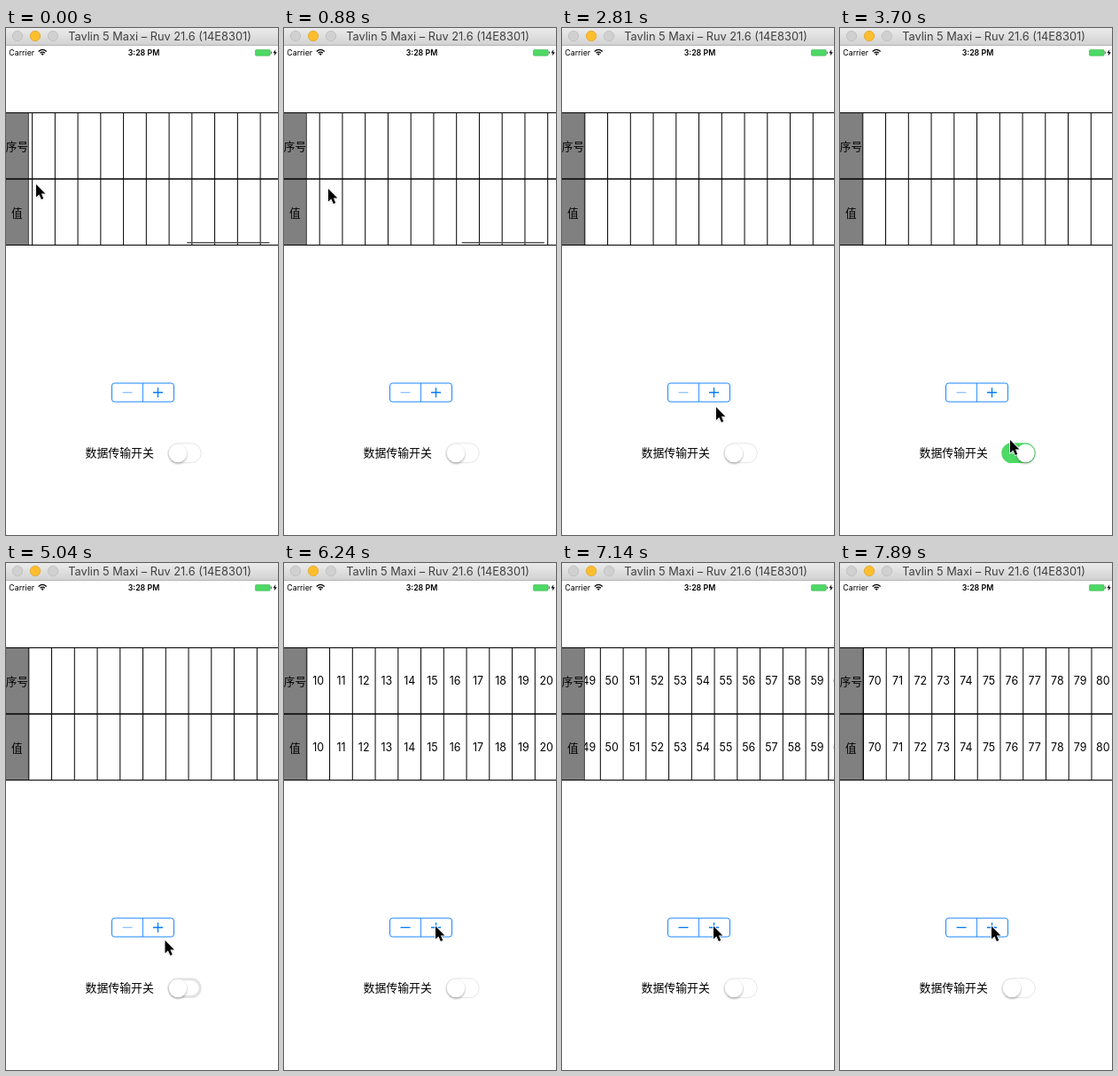
Recreate the animation shown at these times as an HTML page. Size 307x571 px, loop 8000 ms.

```html
<!DOCTYPE html>
<html lang="zh">
<head>
<meta charset="utf-8">
<title>Data table</title>
<style>
  html, body { margin: 0; width: 100%; height: 100%; overflow: hidden; background: #fff; }
  svg { display: block; width: 100%; height: 100%; }
  text { font-family: Inter, "Noto Sans CJK SC", "Noto Sans CJK", sans-serif; }
  .cjk { font-family: "Noto Sans CJK SC", "Noto Sans CJK", sans-serif; }
  .mid { text-anchor: middle; }
</style>
</head>
<body>
<svg viewBox="0 0 307 571">
  <defs>
    <linearGradient id="bar" x2="0" y2="1">
      <stop stop-color="#ebebeb"/><stop offset="1" stop-color="#d1d1d1"/>
    </linearGradient>
    <filter id="soft" x="-50%" y="-50%" width="200%" height="200%"><feGaussianBlur stdDeviation="1"/></filter>
    <clipPath id="table"><rect x="25" y="95" width="282" height="150"/></clipPath>
  </defs>

  <rect width="307" height="571" fill="#fff"/>
  <rect width="307" height="20" fill="url(#bar)"/>
  <path d="M0 19.5H307" stroke="#b4b4b4"/>
  <g stroke-width=".7">
    <circle cx="13" cy="9" r="5.7" fill="#d0d0d0" stroke="#b9b9b9"/>
    <circle cx="33" cy="9" r="5.7" fill="#fdbe2e" stroke="#dfa023"/>
    <circle cx="53" cy="9" r="5.7" fill="#d0d0d0" stroke="#b9b9b9"/>
  </g>
  <text class="mid" x="173.5" y="14" font-size="12.8" fill="#404040">Tavlin 5 Maxi – Ruv 21.6 (14E8301)</text>

  <text x="3.3" y="31" font-size="8.8">Carrier</text>
  <g fill="none" stroke="#000" stroke-width="1.3">
    <path d="M36.7 26.4Q41.2 22.4 45.7 26.4M38.5 28.2Q41.2 25.9 43.9 28.2"/>
    <path d="M39.7 29.2Q41.2 28 42.7 29.2L41.2 31Z" fill="#000" stroke="none"/>
  </g>
  <text class="mid" x="155.5" y="31" font-size="8.8" font-weight="600">3:28 PM</text>
  <rect x="281.4" y="24.4" width="16.8" height="6.8" rx="1.3" fill="#4cd964" stroke="#3fae52" stroke-width=".6"/>
  <path d="M299.3 26.5V29" stroke="#555"/>
  <path d="M304.4 24L301.4 28.2H303.4L302.6 31.6L305.8 27.2H303.7Z"/>

  <g clip-path="url(#table)">
    <path id="lines" stroke="#000" fill="none"/>
    <g id="cells" class="mid" font-size="12.4"></g>
  </g>
  <rect y="95" width="25.3" height="150" fill="#808080"/>
  <path d="M25.4 95V245" stroke="#222" stroke-width=".8"/>
  <path d="M0 95.5H307M0 244.5H307" stroke="#000"/>
  <path d="M0 170H307" stroke="#000" stroke-width="1.5"/>
  <g class="mid" font-size="12.6">
    <text class="cjk" x="12.4" y="137.6">序号</text>
    <text class="cjk" x="12.2" y="212.6">值</text>
  </g>
  <path id="bead" d="M0 241.8H92" stroke="#555" stroke-width="1.6" stroke-linecap="round"/>

  <g fill="none" stroke="#007aff">
    <path d="M154.5 400V421" stroke-width=".8"/>
    <rect x="119.5" y="400" width="70" height="21" rx="3" stroke-width=".9"/>
    <path id="minus" d="M131.5 410.5H142.5" stroke-width="1.3"/>
    <path d="M166 410.5H177M171.5 405V416" stroke-width="1.3"/>
  </g>

  <text class="cjk" x="89.5" y="483.4" font-size="12.9">数据传输开关</text>
  <rect id="track" fill="#fff"/>
  <circle id="shade" cy="480.6" r="10.3" fill="#000" opacity=".28" filter="url(#soft)"/>
  <circle id="thumb" cy="478.8" r="10.4" fill="#fff" stroke="#000" stroke-opacity=".08" stroke-width=".5"/>

  <g id="cursor">
    <path d="M0 1V15L3.4 12L6 17.6L8.6 16.6L6.2 11H10.8Z" fill="#000" opacity=".35" filter="url(#soft)"/>
    <path d="M0 0V14.4L3.4 11.4L5.9 17L8.3 16L5.9 10.4H10.4Z" stroke="#fff" stroke-width="1.6" paint-order="stroke"/>
  </g>
</svg>
<script>
const $ = id => document.getElementById(id);
const LOOP = 8000, HOLD = 148, STEP = 148.5, LAST = 53;
const LEFT = 25.8, PITCH = 25.75;

// [time, x, y] of the pointer tip, and [time, px] of the table while dragged
const pointer = [
  [0, 34, 176], [700, 50, 181], [1480, 40, 190], [1633, 40, 190], [1930, 90, 290],
  [2230, 165, 458], [2370, 174, 427], [2700, 174, 427], [3000, 192, 462], [3150, 200, 474],
  [3480, 200, 474], [3712, 192, 464], [3860, 183, 440], [4010, 195, 466], [4160, 195, 466],
  [4450, 203, 480], [4750, 203, 480], [5049, 179.5, 425], [5350, 172, 411], [5640, 171, 409]
];
const drag = [[0, 3.8], [500, 19], [900, 12], [1200, 3], [1480, 0]];
const taps = [5790, 6240, 6480, 6700, 6900, 7055, 7560];

const clamp = v => Math.min(1, Math.max(0, v));
const ease = v => { v = clamp(v); return v * v * (3 - 2 * v); };
const ramp = (t, start, span) => ease((t - start) / span);

function along(keys, t, axis) {
  const i = keys.findIndex(k => k[0] > t);
  if (i < 0) return keys[keys.length - 1][axis];
  const a = keys[i - 1], b = keys[i];
  return a[axis] + (b[axis] - a[axis]) * ramp(t, a[0], b[0] - a[0]);
}

function set(id, attrs) {
  for (const name in attrs) $(id).setAttribute(name, attrs[name]);
}

const slots = Array.from({ length: 26 }, (_, i) => {
  const label = document.createElementNS("http://www.w3.org/2000/svg", "text");
  label.setAttribute("y", i % 2 ? 212.4 : 137.4);
  return $("cells").appendChild(label);
});

function drawTable(t) {
  const shift = along(drag, t, 1);
  const scroll = taps.reduce((sum, tap) => sum + 10 * ramp(t, tap, 320), 0);
  const first = Math.floor(scroll);
  const edge = n => LEFT + shift + (n - scroll) * PITCH;

  let d = "";
  for (let n = first - 1; n < first + 13; n++) d += `M${edge(n).toFixed(2)} 95V245`;
  set("lines", { d });
  slots.forEach((label, i) => {
    const n = first + (i >> 1);
    label.setAttribute("x", edge(n) + PITCH / 2);
    label.textContent = t > 5740 ? n : "";
  });
  set("bead", {
    transform: `translate(${204.8 - (shift - 3.8) / 3} 0)`,
    opacity: 1 - ramp(t, 1200, 330)
  });
}

function drawSwitch(t) {
  const on = ramp(t, 3330, 260) - ramp(t, 4700, 280);
  const lit = t >= 3330 && t < 4740;
  const grow = lit ? ramp(t, 3330, 260) : 1 - ramp(t, 4740, 440);
  const rim = lit || t >= 4740 ? 0.9 + 10 * grow : 0.9;
  set("track", {
    x: 182.3 + rim / 2, y: 467.3 + rim / 2,
    width: 38.4 - rim, height: 22.8 - rim, rx: (22.8 - rim) / 2,
    stroke: lit ? "#4cd964" : "#e3e3e3", "stroke-width": rim
  });
  const cx = 194 + 15.4 * on;
  set("thumb", { cx });
  set("shade", { cx });
}

function draw(t) {
  drawTable(t);
  drawSwitch(t);
  set("minus", { opacity: t > 5600 ? 1 : 0.45 });
  set("cursor", { transform: `translate(${along(pointer, t, 1)} ${along(pointer, t, 2)})` });
}

function tick() {
  const beat = Math.min(LAST, Math.floor((performance.now() % LOOP) / HOLD));
  draw(beat * STEP);
  requestAnimationFrame(tick);
}
tick();
</script>
</body>
</html>
```
